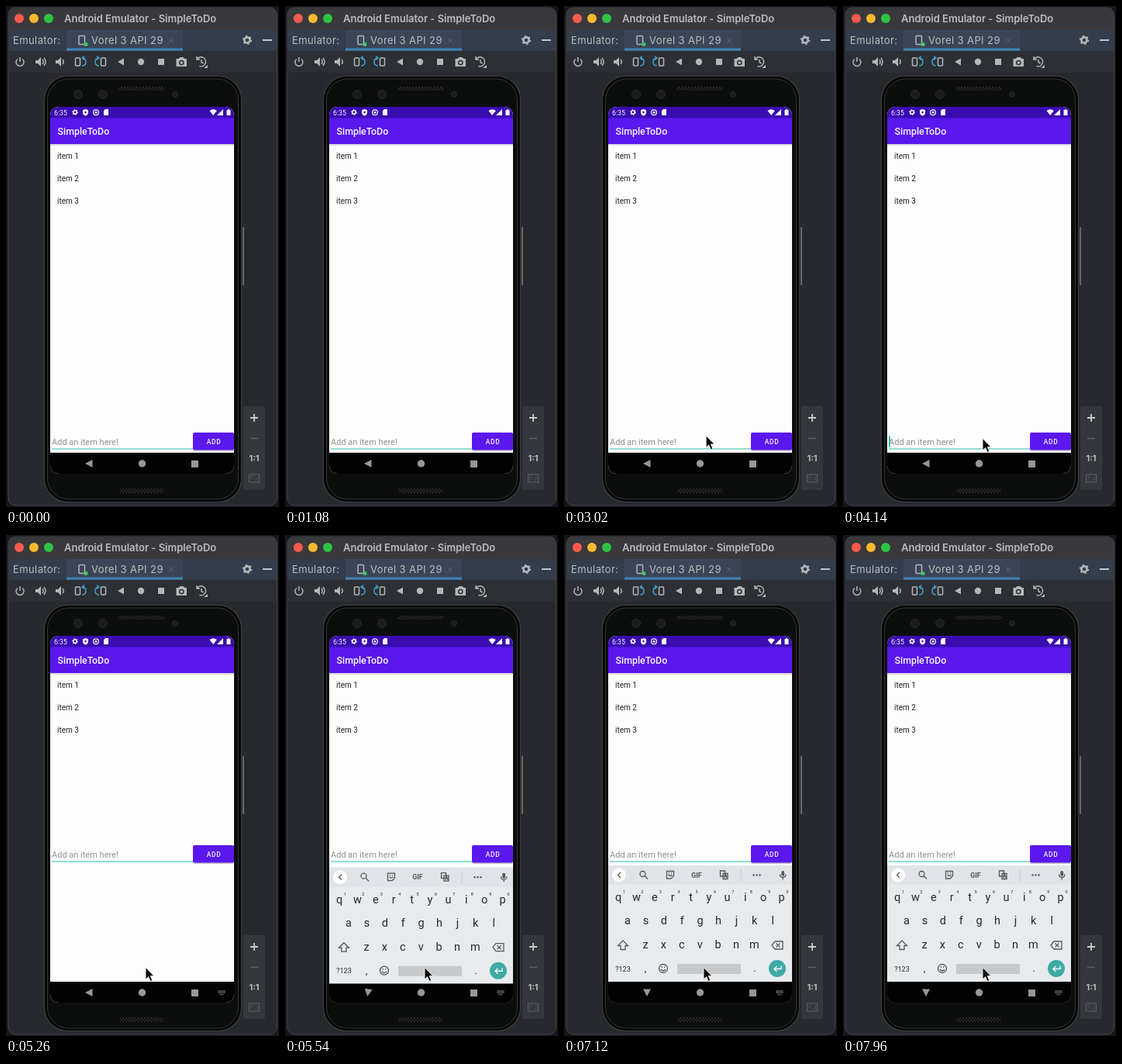
An HTML page that plays this animation: 352x646 px, repeating every 8 s.

```html
<!DOCTYPE html>
<html lang="en">
<head>
<meta charset="utf-8">
<style>
  html, body { margin: 0; width: 100%; height: 100%; overflow: hidden; background: #17161d; }
  svg { display: block; width: 352px; height: 646px; }
  text { font-family: Roboto, sans-serif; }
  .ui text { font-family: Inter, sans-serif; fill: #bcbdbf; }
  .mid { text-anchor: middle; }
  .line { fill: none; stroke: #b4b6b9; stroke-width: 1.5; }
  .solid { fill: #b4b6b9; }
  .blue { fill: none; stroke: #4299c6; stroke-width: 1.6; }
  .white { fill: #f7f5ff; }
  .key { fill: none; stroke: #55585b; stroke-width: 1.3; }
  .keys text { fill: #26282a; }
</style>
</head>
<body>
<svg viewBox="0 0 352 646">
  <defs>
    <clipPath id="screenClip"><path d="M57 142q0-12 12-12H282q12 0 12 12V591q0 12-12 12H69q-12 0-12-12z"/></clipPath>
    <pattern id="holes" width="4" height="4" patternUnits="userSpaceOnUse">
      <circle cx="1" cy="1" r=".8" fill="#47494b"/><circle cx="3" cy="3" r=".8" fill="#47494b"/>
    </pattern>
    <g id="gear">
      <circle r="3.6" fill="none" stroke="currentColor" stroke-width="2.6"/>
      <circle r="5.3" fill="none" stroke="currentColor" stroke-width="1.8" stroke-dasharray="2.2 3.35"/>
    </g>
    <g id="speaker"><path class="solid" d="M-6-2h3l4-4V6l-4-4h-3z"/><path class="line" d="M3-3q2.5 3 0 6"/></g>
    <g id="turn">
      <rect class="line" x="-6.5" y="-5" width="6" height="10" rx="1"/>
      <path class="blue" d="M2-5q5 0 5 5t-5 5M5-7.5L2-5l3 2.5"/>
    </g>
  </defs>

  <!-- Emulator window -->
  <g class="ui">
    <rect x="3" y="2" width="346.5" height="642" rx="9" fill="#27292e" stroke="#45474b"/>
    <path d="M3.500 31V11q0-8 8-8H341q8 0 8 8V31z" fill="#39393c"/>
    <circle cx="17" cy="16" r="6" fill="#fb5b4e"/>
    <circle cx="36" cy="16" r="6" fill="#f6b92f"/>
    <circle cx="55" cy="16" r="6" fill="#2fc344"/>
    <text x="75" y="20.500" font-size="13" font-weight="600">Android Emulator - SimpleToDo</text>
    <rect x="3.500" y="31" width="345.500" height="27" fill="#333d4b"/>
    <rect x="78" y="31" width="150" height="27" fill="#3a4658"/>
    <rect x="78" y="54.500" width="150" height="3" fill="#3d83b5"/>
    <text x="9" y="49" font-size="13" letter-spacing=".4">Emulator:</text>
    <rect class="line" x="94" y="38.500" width="7.500" height="11" rx="1"/>
    <circle cx="103" cy="49.500" r="2.500" fill="#43cb55"/>
    <text x="110" y="49" font-size="13" letter-spacing=".4">Vorel 3 API 29</text>
    <path d="M210 41.500l6 6m0-6l-6 6" stroke="#5d6672"/>
    <use href="#gear" x="311" y="44" color="#b4b6b9"/>
    <path d="M331 44h12" stroke="#c3c5c8" stroke-width="2"/>
    <rect x="3.500" y="58" width="345.500" height="28" fill="#2c2f34"/>
    <path class="line" d="M15 68.500a5 5 0 1 0 6 0M18 66v6"/>
    <use href="#speaker" x="44" y="72"/><path class="line" d="M49 67q4 5 0 10"/>
    <use href="#speaker" x="70" y="72"/>
    <use href="#turn" x="96" y="72"/>
    <use href="#turn" transform="translate(122 72) scale(-1 1)"/>
    <path class="solid" d="M144 72l8-4.500v9z"/>
    <circle class="solid" cx="174" cy="72" r="4.200"/>
    <rect class="solid" x="196" y="68" width="8" height="8"/>
    <path class="solid" d="M219.500 68h3l2-2h4l2 2h2.500v10h-13.500z"/>
    <circle cx="226.300" cy="73" r="2.600" fill="none" stroke="#2c2f34" stroke-width="1.500"/>
    <path class="line" d="M246.500 68.500a6 6 0 1 1 3 9M246 65v4h4M252 69v3.500l2.500 1.500"/>
    <path class="solid" d="M255 80h5v-4z"/>
  </g>

  <!-- Phone body -->
  <rect x="305" y="285" width="2" height="75" rx="1" fill="#66686c"/>
  <rect x="49.500" y="90.500" width="254" height="549" rx="30" fill="#050606" stroke="#3d3f42" stroke-width="1.200"/>
  <rect x="53.500" y="94" width="246" height="542" rx="27" fill="#0c0d0d" stroke="#343638"/>
  <g fill="#1b1c1d" stroke="#27292a">
    <circle cx="93" cy="114" r="5.500"/><circle cx="125" cy="114" r="5.500"/><circle cx="218" cy="114" r="3.500"/>
  </g>
  <rect x="145" y="104" width="60" height="5" rx="2.500" fill="url(#holes)"/>
  <rect x="146" y="622" width="58" height="6" rx="3" fill="url(#holes)"/>

  <!-- Zoom panel -->
  <g class="ui">
    <rect x="306" y="516" width="28" height="108" rx="3" fill="#34373c"/>
    <path d="M315 531h10m-5-5v10" stroke="#c9cbce" stroke-width="1.800"/>
    <path d="M315 557.500h10" stroke="#5d6064" stroke-width="1.600"/>
    <text class="mid" x="320" y="587" font-size="11" font-weight="700">1:1</text>
    <rect x="313.500" y="604" width="13" height="10" fill="none" stroke="#5c5f64"/>
    <path d="M316 611v-4h3m5 0v4h-3" fill="none" stroke="#4d5055"/>
  </g>

  <!-- Phone screen -->
  <g clip-path="url(#screenClip)">
    <rect x="57" y="130" width="237" height="473" fill="#fdfdfe"/>
    <rect x="57" y="130" width="237" height="15" fill="#3a0cb0"/>
    <rect x="57" y="178" width="237" height="2" fill="#dcdae2"/>
    <rect x="57" y="144.500" width="237" height="33.500" fill="#5a18ee"/>
    <g class="white">
      <text x="62" y="140.500" font-size="8.800">6:35</text>
      <use href="#gear" transform="translate(89 137) scale(.62)" color="#f7f5ff"/>
      <path d="M102.500 133l3.500 1.300v3q0 3-3.500 4.500q-3.500-1.500-3.500-4.500v-3z"/>
      <circle cx="102.500" cy="137" r="1.200" fill="#3a0cb0"/>
      <circle cx="116" cy="137.300" r="3.400" fill="none" stroke="#f7f5ff" stroke-width="1.200"/>
      <circle cx="116" cy="137.300" r="1.500"/>
      <path d="M126 135l2-2h4v8h-6z"/>
      <path d="M262.500 135q4.700-3.500 9.400 0l-4.700 6z"/>
      <path d="M280 133v8h-8z"/>
      <path d="M284.500 134h1.500v-1h2v1h1.500v7h-5z"/>
      <text x="66.500" y="166" font-size="12.400" font-weight="500">SimpleToDo</text>
    </g>
    <g font-size="10" fill="#242424">
      <text x="66" y="197">item 1</text><text x="66" y="226">item 2</text><text x="66" y="255">item 3</text>
    </g>
    <g id="entry">
      <text x="59" y="566" font-size="11" fill="#909090">Add an item here!</text>
      <rect x="59" y="570.500" width="183" height="1.100" fill="#3fc3b4"/>
      <rect id="caret" x="59" y="554.500" width="1.800" height="14.500" fill="#20b5a8"/>
      <rect x="241" y="551" width="53" height="23" rx="2" fill="#c4c1cc"/>
      <rect x="241" y="550" width="53" height="22.500" rx="2" fill="#5a18ee"/>
      <text class="mid white" x="268" y="564.800" font-size="8.400" font-weight="500" letter-spacing=".7">ADD</text>
    </g>
    <rect x="57" y="576" width="237" height="27" fill="#020202"/>
    <g id="keyboard" class="keys">
      <rect x="57" y="426" width="237" height="150" fill="#e8ebee"/>
      <rect x="57" y="426" width="237" height="25" fill="#e0e3e7"/>
      <rect x="57" y="576" width="237" height="150" fill="#020202"/>
      <circle cx="71" cy="438.500" r="9" fill="#fdfdfe"/>
      <path class="key" d="M73 435l-3.500 3.500l3.500 3.500"/>
      <circle class="key" cx="101.500" cy="437" r="3.500"/><path class="key" d="M104 439.500l4 4"/>
      <path class="key" d="M132.500 433.500h9v6l-3.500 3.500h-5.500zM134.500 438q2.500 3 5 0M135 436h1m2 0h1"/>
      <text class="mid" x="171" y="441.500" font-size="8.800" font-weight="700" style="fill:#55585b">GIF</text>
      <path class="key" d="M201.500 433h6v7h-6zM205 436.500h6v7h-6zM207 442l1.500-4l1.500 4"/>
      <path d="M228 430v17" stroke="#cbced2"/>
      <g fill="#55585b">
        <circle cx="244.500" cy="438.500" r="1.200"/><circle cx="248.500" cy="438.500" r="1.200"/><circle cx="252.500" cy="438.500" r="1.200"/>
        <rect x="280.300" y="433" width="3.800" height="7" rx="1.900"/>
      </g>
      <path class="key" d="M278.500 437.500q0 4 3.700 4t3.700-4M282.200 441.500v3"/>
      <g id="letters" class="mid"></g>
      <path class="key" d="M76 523l6.500 6.500h-3.500v5h-6v-5h-3.500z"/>
      <path class="key" d="M268 529l4-5h10v10h-10zM273.500 526.500l5 5m0-5l-5 5"/>
      <text class="mid" x="76" y="562.500" font-size="9">?123</text>
      <text class="mid" x="105" y="563" font-size="13">,</text>
      <circle class="key" cx="128" cy="559" r="5.500"/>
      <path class="key" d="M125 560q3 4 6 0M125.500 557h1.500m2 0h1.500"/>
      <rect x="146" y="553" width="82" height="13" rx="1.500" fill="#c6c9cb"/>
      <text class="mid" x="246" y="563" font-size="13">.</text>
      <circle cx="275" cy="559" r="11" fill="#3eaba4"/>
      <path d="M280 555.500v4h-9m3.500-3.500l-3.500 3.500l3.500 3.500" fill="none" stroke="#f7fafa" stroke-width="1.400"/>
    </g>
    <g fill="#96979a">
      <path id="back" d="M-5 0L4.500-5V5z"/>
      <circle cx="175.500" cy="590" r="4.700"/>
      <rect x="239" y="586" width="9" height="9"/>
      <path id="imeIcon" d="M273.500 588h9m-9 2h9m-7 2.500h5" stroke="#77787b" stroke-width="1.300" stroke-dasharray="1.400 .5"/>
    </g>
  </g>

  <path id="pointer" d="M0 0V15.500L3.600 12.200L6.200 18L8.800 16.900L6.300 11.200H11z" fill="#050505" stroke="#f4f4f4" stroke-width="1"/>
</svg>
<script>
const LOOP = 8000, FOCUS = 4060, RESIZE = 5220, SLIDE = 5290, SLIDE_MS = 340;
const el = id => document.getElementById(id);
const show = (id, on) => el(id).setAttribute('visibility', on ? 'visible' : 'hidden');
const move = (id, x, y, turn = 0) =>
  el(id).setAttribute('transform', `translate(${x} ${y}) rotate(${turn})`);
const progress = (t, start, length) => Math.min(1, Math.max(0, (t - start) / length));
const mix = (a, b, u) => a + (b - a) * u;
const smooth = u => u * u * (3 - 2 * u);

const rows = [['qwertyuiop', 70, 472], ['asdfghjkl', 82, 502], ['zxcvbnm', 105, 533]];
el('letters').innerHTML = rows.map(([letters, x, y], row) =>
  [...letters].map((letter, i) => {
    const keyX = x + 23.4 * i;
    const digit = row ? '' : `<text x="${keyX + 7.5}" y="${y - 10}" font-size="5.5">${(i + 1) % 10}</text>`;
    return `<text x="${keyX}" y="${y}" font-size="14.5">${letter}</text>${digit}`;
  }).join('')).join('');

function caretOn(t) {
  if (t < FOCUS) return false;
  if (t < RESIZE) return t < FOCUS + 500;
  return t >= 6150 && (t - 6150) % 1000 < 500;
}

function draw(t) {
  const enter = smooth(progress(t, 1500, 500));
  const settle = smooth(progress(t, 2700, 600));
  show('pointer', t >= 1500);
  move('pointer', mix(mix(240, 187, enter), 180, settle), mix(mix(646, 549.5, enter), 557.5, settle));

  const rest = 1 - progress(t, SLIDE, SLIDE_MS);
  show('keyboard', t >= SLIDE);
  move('keyboard', 0, 150 * rest ** 3);
  move('entry', 0, t >= RESIZE ? -150 : 0);
  move('back', 107, 590, -90 * (1 - rest ** 1.7));
  show('imeIcon', t >= RESIZE);
  show('caret', caretOn(t));
}

const start = performance.now();
function tick() {
  draw((performance.now() - start) % LOOP);
  requestAnimationFrame(tick);
}
tick();
</script>
</body>
</html>
```
